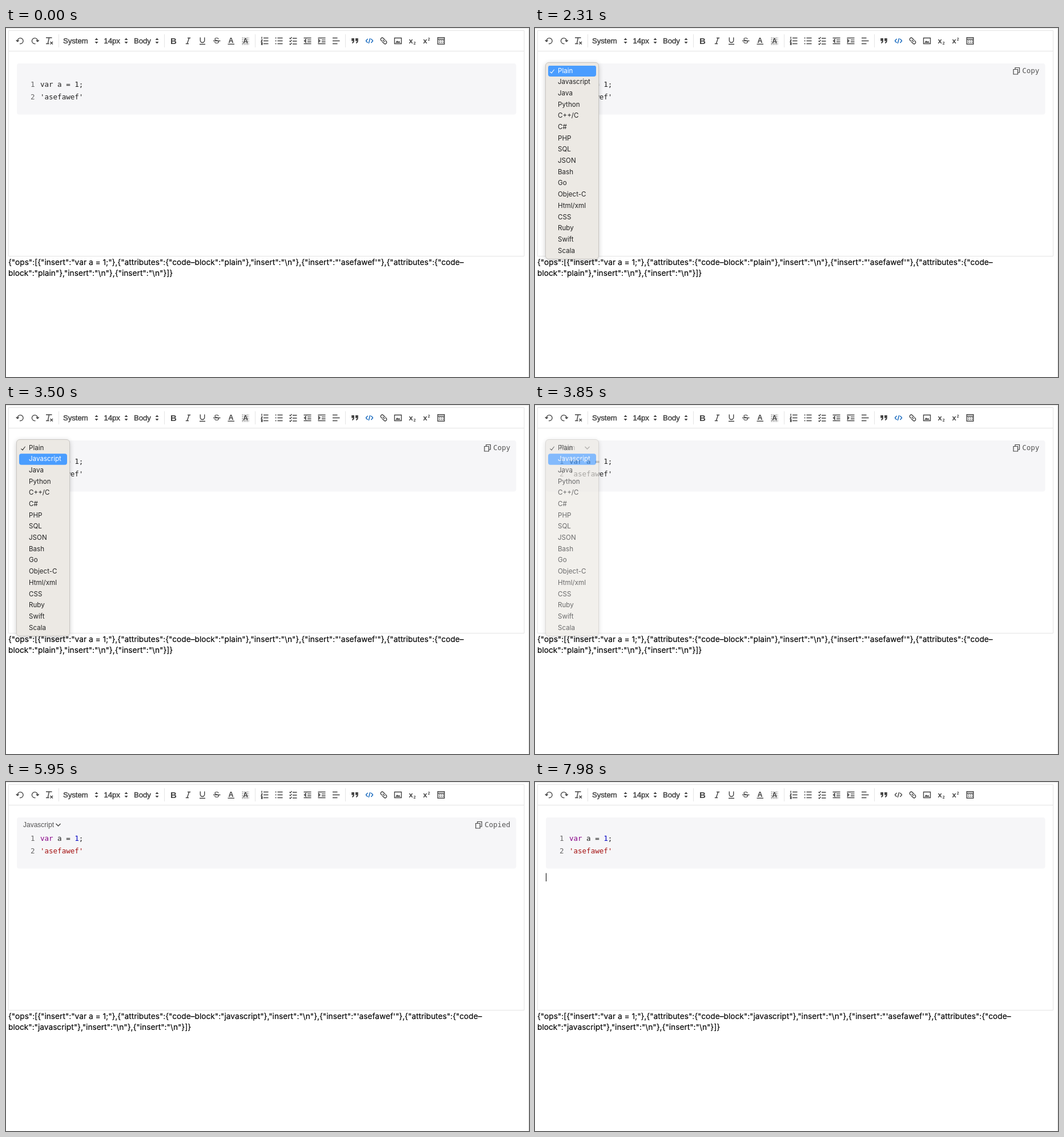
Animation, 916 px wide and 611 px high, one loop 8000 ms. Source, as an HTML page:

```html
<!DOCTYPE html>
<html lang="en">
<head>
<meta charset="utf-8">
<title>Code block editor</title>
<style>
  html, body { margin: 0; width: 100%; height: 100%; overflow: hidden; background: #fff; }
  #stage { position: relative; width: 916px; height: 611px; overflow: hidden; }
  svg { position: absolute; inset: 0; }
  text { white-space: pre; }

  .icons path, .icons g { fill: none; stroke: #444; stroke-width: 1.4; }
  .icons .solid { fill: #444; stroke: none; }
  .icons text { font: bold 14px "Liberation Sans", Arial, sans-serif; fill: #444; text-anchor: middle; }
  .icons .pick { font-weight: 400; font-size: 13.1px; text-anchor: start; stroke: #444; stroke-width: .45px; }
  .mono { font: 12.5px "DejaVu Sans Mono", monospace; fill: #222; }
  .mono .num { fill: #666; }
  .label { font: 12px "Liberation Sans", Arial, sans-serif; fill: #555; }
  .json { font: 13.71px Inter, sans-serif; fill: #000; stroke: #000; stroke-width: .15px; }

  #menu { position: absolute; left: 18px; top: 60px; width: 92px; height: 343px; border: 1px solid #c9c6c2;
    border-radius: 6px; background: #ece9e4; box-shadow: 0 2px 8px rgba(0,0,0,.2); }
  .list { position: absolute; left: 4px; top: 4.6px; width: 84px; font: 11.6px/19.7px Inter, sans-serif; color: #222; }
  .list div { height: 19.7px; padding-left: 17px; }
  .list div:first-child::before { content: ""; position: absolute; left: 5px; top: 5px; width: 3px; height: 7px;
    border: solid; border-width: 0 1.6px 1.6px 0; transform: rotate(38deg); }
  .hot { --n: 0; color: #fff; background: #4a9dff;
    clip-path: inset(calc(var(--n) * 19.7px) 0 calc((16 - var(--n)) * 19.7px) round 4px); }

  /* one loop is 8 s: 1% = 80 ms */
  #menu, .hot, .tools, .old, .new, .copy, .copied, .hover, .caret, .tint, .code { animation: 8s step-end infinite; }
  .tools { animation-name: tools; animation-timing-function: linear; }
  #menu { animation-name: menu; }
  .hot { animation-name: row; }
  .old { animation-name: old; }
  .new { animation-name: new; }
  .copy { animation-name: copy; }
  .copied { animation-name: copied; }
  .hover { animation-name: hover; }
  .caret { animation-name: caret; }
  .tint { animation-name: tint; }
  .icons path.code { animation-name: blur; }

  @keyframes tools { 0%, 19.5% { opacity: 0 } 23.6%, 78% { opacity: 1 } 80.5%, 100% { opacity: 0 } }
  @keyframes menu {
    0% { opacity: 0 }
    28% { opacity: 1 }
    45% { opacity: 1; animation-timing-function: linear }
    48.125% { opacity: .67; animation-timing-function: linear }
    50.7%, 100% { opacity: 0 }
  }
  @keyframes row {
    0% { --n: 0 }
    33.25% { --n: 1 }
    34.125% { --n: 2 }
    35.875% { --n: 3 }
    38.5% { --n: 2 }
    40.25% { --n: 1 }
    42.875% { --n: 20 }
    43.75%, 100% { --n: 1 }
  }
  @keyframes old { 0% { opacity: 1 } 49.875%, 100% { opacity: 0 } }
  @keyframes new { 0% { opacity: 0 } 49.875%, 100% { opacity: 1 } }
  @keyframes tint { 0% { fill: #222 } 49.875%, 100% { fill: var(--c) } }
  @keyframes hover { 0% { opacity: 0 } 63.875% { opacity: 1 } 74.375%, 100% { opacity: 0 } }
  @keyframes copy { 0% { opacity: 1 } 69.125%, 100% { opacity: 0 } }
  @keyframes copied { 0% { opacity: 0 } 69.125%, 100% { opacity: 1 } }
  @keyframes caret { 0% { opacity: 0 } 94.5%, 100% { opacity: 1 } }
  @keyframes blur { 0% { stroke: #1266bd } 94.5%, 100% { stroke: #444 } }
</style>
</head>
<body>
<div id="stage">
<svg width="916" height="611" viewBox="0 0 916 611">
  <defs>
    <path id="sort" d="M-3-1.5L0-5 3-1.5zM-3 1.5L0 5 3 1.5z"/>
    <path id="pages" fill="none" stroke="#444" stroke-width="1.2" d="M0 3.5H7.5V12H0zM3 3.5V.5H10.5V9H7.5"/>
  </defs>

  <!-- frame -->
  <g fill="none" stroke="#e4e4e4">
    <path d="M4.5 4.5H907.5V399.5H4.5zM4.5 40.5H907.5M92.5 11V34M277.5 11V34M436.5 11V34M594.5 11V34"/>
    <path d="M0 .5H915.5V611" stroke="#e2e2e2"/>
  </g>

  <!-- toolbar -->
  <g class="icons">
    <path transform="translate(25 22.5)" d="M-4.9.5A5 5 0 1 1-1 5M-7.2-1.2L-4.9 1.3-2.4-.9"/>
    <path transform="translate(50.5 22.5) scale(-1 1)" d="M-4.9.5A5 5 0 1 1-1 5M-7.2-1.2L-4.9 1.3-2.4-.9"/>
    <path transform="translate(76 22.5)" d="M-6-5.5H4.5M-.5-5.5L-2.7 5M-6 5H-.5M1.5 1.5L6 6M6 1.5L1.5 6"/>
    <text class="pick" x="100" y="27">System</text>
    <text class="pick" x="171.5" y="27">14px</text>
    <text class="pick" x="224" y="27">Body</text>
    <use class="solid" href="#sort" x="158.5" y="22.5"/>
    <use class="solid" href="#sort" x="210.5" y="22.5"/>
    <use class="solid" href="#sort" x="264.5" y="22.5"/>

    <text x="293.5" y="27.5" style="font-size:15px">B</text>
    <path transform="translate(319 22.5)" d="M-1-5H4.2M-4.2 5H1M1.7-5L-1.7 5"/>
    <path transform="translate(344 22.5)" d="M-3.7-6V-.7a3.7 3.7 0 0 0 7.4 0V-6M-5 6H5"/>
    <text x="369" y="27.3" style="font-weight:400">S</text>
    <path d="M363 22.5H375.5"/>
    <text x="394" y="25.5" style="font-size:12.5px">A</text>
    <path d="M388.5 28.3H400" stroke-width="1"/>
    <path d="M413.5 17.5H426M413.5 20.5H426M413.5 23.5H426M413.5 26.5H426M413.5 28.8H426" style="stroke-dasharray:1.5 1.5;stroke-width:1"/>
    <text x="419.6" y="27.3" style="font-size:12.5px">A</text>

    <path transform="translate(453 22.5)" d="M-2-5H6.5M-2 0H6.5M-2 5H6.5M-5-7V-3.5M-6.3-1.5H-4.2L-6 1.5H-4M-6.3 3.5H-4.2V6.5H-6.3M-6 5H-4.2"/>
    <path transform="translate(478 22.5)" d="M-2.5-5H6.5M-2.5 0H6.5M-2.5 5H6.5M-6.5-5H-4.5M-6.5 0H-4.5M-6.5 5H-4.5"/>
    <path transform="translate(503 22.5)" d="M-1-4.5H6.5M-1 .5H6.5M-1 5.5H6.5M-6.5-5L-5-3.5-2.5-6.5M-6.5 0L-5 1.5-2.5-1.5M-6.5 5L-5 6.5-2.5 3.5"/>
    <path transform="translate(528 22.5)" d="M-6.5-5H6.5M0-1.6H6.5M0 1.7H6.5M-6.5 5H6.5M-3-2.5L-5.5 0-3 2.5z"/>
    <path transform="translate(553 22.5)" d="M-6.5-5H6.5M0-1.6H6.5M0 1.7H6.5M-6.5 5H6.5M-5.5-2.5L-3 0-5.5 2.5z"/>
    <path transform="translate(578 22.5)" d="M-6-5H2.5M-6 0H6.5M-6 5H2.5"/>

    <path class="solid" transform="translate(611 22.5)" d="M-5.8-4.6h4.8v4.3q0 4-3.8 4.9v-1.9q1.6-.6 1.7-2.4h-2.7zM1-4.6h4.8v4.3q0 4-3.8 4.9v-1.9q1.6-.6 1.7-2.4h-2.7z"/>
    <path class="code" transform="translate(636.5 22.5)" d="M-3-3.5L-6 0-3 3.5M3-3.5L6 0 3 3.5M1.3-4.5L-1.3 4.5"/>
    <path transform="translate(661.5 22.5) rotate(45)" d="M1-2.7H-3.6a2.7 2.7 0 0 0 0 5.4H-1.5M-1 2.7H3.6a2.7 2.7 0 0 0 0-5.4H1.5M-2.5 0H2.5"/>
    <path transform="translate(686.5 22.5)" d="M-6-5H6V5H-6z"/>
    <path class="solid" transform="translate(686.5 22.5)" d="M-4.3 3.2L-1.5-.5.5 1.8 2 .3 4.3 3.2z"/>
    <text x="709" y="26.5" style="font-size:13px">x</text>
    <text x="715.7" y="29" style="font-size:7px">2</text>
    <text x="734" y="26.5" style="font-size:13px">x</text>
    <text x="740.7" y="21.5" style="font-size:7px">2</text>
    <path transform="translate(762 22.5)" d="M-5.8-5.8H5.8V5.8H-5.8zM-5.8-2.8H5.8"/>
    <path d="M758 22.4H767M758 25.4H767" style="stroke-dasharray:2 1.4"/>
  </g>

  <!-- code block -->
  <rect x="19" y="62" width="874.5" height="89.5" rx="4" fill="#f6f6f8"/>
  <g class="mono">
    <text class="num" x="43" y="103">1</text>
    <text class="num" x="43" y="125">2</text>
    <text x="60" y="103"><tspan class="tint" style="--c:#870087">var</tspan> a = <tspan class="tint" style="--c:#0000c4">1</tspan>;</text>
    <text class="tint" style="--c:#a51111" x="60" y="125">'asefawef'</text>
  </g>
  <g class="tools">
    <text class="label old" x="43.5" y="79">Plain</text>
    <text class="label new" x="30" y="79">Javascript</text>
    <path d="M87.5 73L91.5 77 95.5 73" fill="none" stroke="#444" stroke-width="1.4"/>
    <g class="copy">
      <rect class="hover" x="831" y="64" width="55" height="22" rx="3" fill="#e9eaed"/>
      <use href="#pages" x="838" y="69"/>
      <text class="mono" style="fill:#555" x="853.3" y="79">Copy</text>
    </g>
    <g class="copied">
      <rect class="hover" x="816" y="64" width="70" height="22" rx="3" fill="#e9eaed"/>
      <use href="#pages" x="822.7" y="69"/>
      <text class="mono" style="fill:#555" x="838.2" y="79">Copied</text>
    </g>
  </g>
  <rect class="caret" x="19" y="159.5" width="1" height="14.5" fill="#000"/>

  <!-- document dump -->
  <g class="json old">
    <text x="4" y="415">{"ops":[{"insert":"var a = 1;"},{"attributes":{"code–block":"plain"},"insert":"\n"},{"insert":"'asefawef'"},{"attributes":{"code–</text>
    <text x="4" y="434">block":"plain"},"insert":"\n"},{"insert":"\n"}]}</text>
  </g>
  <g class="json new">
    <text x="4" y="415">{"ops":[{"insert":"var a = 1;"},{"attributes":{"code–block":"javascript"},"insert":"\n"},{"insert":"'asefawef'"},{"attributes":{"code–</text>
    <text x="4" y="434">block":"javascript"},"insert":"\n"},{"insert":"\n"}]}</text>
  </g>
</svg>
<div id="menu"><div class="list"></div><div class="list hot"></div></div>
</div>
<script>
  const langs = 'Plain Javascript Java Python C++/C C# PHP SQL JSON Bash Go Object-C Html/xml CSS Ruby Swift Scala'.split(' ');
  for (const list of document.querySelectorAll('.list'))
    list.innerHTML = langs.map(name => `<div>${name}</div>`).join('');
</script>
</body>
</html>
```
